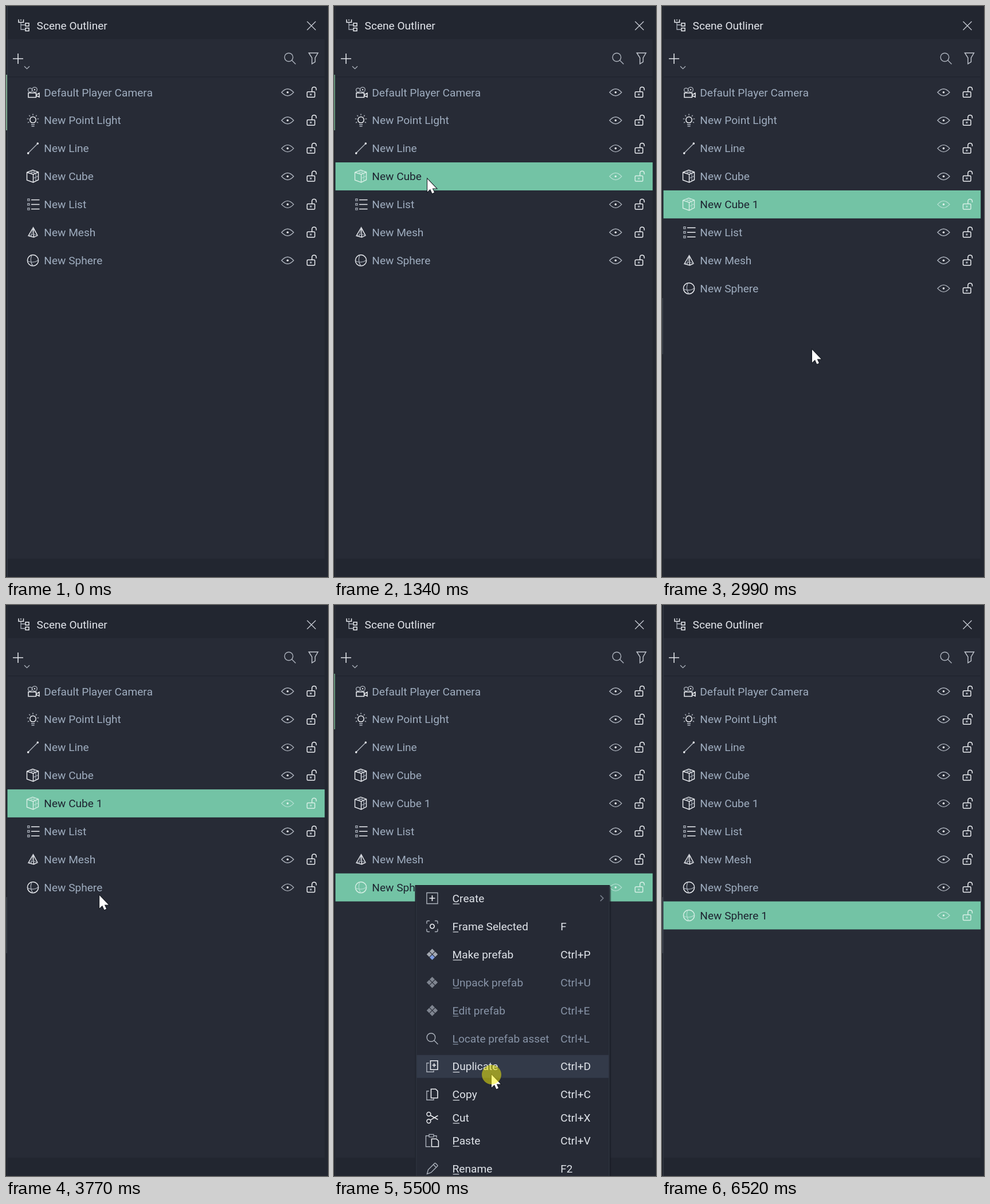
An HTML page with a canvas for the animation above (6.74 s loop, 562 by 997 pixels).

```html
<!DOCTYPE html>
<html lang="en">
<head>
<meta charset="utf-8">
<title>Scene Outliner</title>
<style>
html, body { margin: 0; width: 100%; height: 100%; overflow: hidden; background: #222630; }
canvas { display: block; width: 562px; height: 997px; }
</style>
</head>
<body>
<canvas id="stage"></canvas>
<script>
const W = 562, H = 997, LOOP = 6740;
const canvas = document.getElementById('stage');
const ctx = canvas.getContext('2d');
const dpr = window.devicePixelRatio || 1;
canvas.width = W * dpr;
canvas.height = H * dpr;

const OUTER = '#222630', PANEL = '#272b36', GREEN = '#73c3a5', INK = '#1d2330';
const BRIGHT = '#eceef2', LIGHT = '#e0e4ea', MUTED = '#9fadbf', DIM = '#8793a6', GRAY = '#adb3bd';
const ROW_H = 48.9, ROW_TOP = 126.35;

const TICKS = [0, 70, 290, 510, 720, 940, 1120, 1340, 1520, 1700, 1890, 2080, 2270, 2460, 2640,
  2820, 2990, 3140, 3270, 3430, 3590, 3750, 3920, 4080, 4240, 4410, 4580, 4760, 4930, 5110,
  5320, 5500, 5670, 5840, 6010, 6180, 6350, 6520];

// Pointer path: time, x, y
const PATH = [[70, 262, 610], [940, 163, 302], [1700, 163, 302], [2270, 244, 547], [2640, 264, 612],
  [2820, 264, 612], [2990, 262, 600], [3270, 262, 600], [3920, 143, 488], [4580, 143, 488],
  [5320, 275, 822], [5500, 275, 820], [6520, 275, 820]];

const box = (x, y, w, h) => `M${x} ${y}h${w}v${h}h${-w}z`;
const ring = (x, y, r) => `M${x - r} ${y}a${r} ${r} 0 1 0 ${2 * r} 0a${r} ${r} 0 1 0 ${-2 * r} 0z`;
const gem = (x, y, r) => `M${x} ${y - r}l${r} ${r}l${-r} ${r}l${-r} ${-r}z`;
const line = (d, color = BRIGHT, width = 1.5) => ({ path: new Path2D(d), color, width });
const solid = (d, color = BRIGHT) => ({ path: new Path2D(d), color });

function rays() {
  let d = '';
  for (let i = 0; i < 7; i++) {
    const a = (150 + i * 40) * Math.PI / 180, c = Math.cos(a), s = Math.sin(a);
    d += `M${c * 7.6} ${s * 7.6 - 1}L${c * 10.4} ${s * 10.4 - 1}`;
  }
  return d;
}

const prefab = (top, bottom) => [
  solid(gem(0, -5.2, 4.5) + gem(-5.2, 0, 4.5) + gem(5.2, 0, 4.5), top),
  solid(gem(0, 5.2, 4.5), bottom)
];
const glass = [line(ring(-2, -2, 7.3), GRAY, 1.4), line('M3.3 3.3L10 10', GRAY, 1.4)];

const ICONS = {
  tree: [
    line('M-9 -10.5v5h8.5v-5M-5 -10.5v2', BRIGHT, 1.5),
    line('M-5 -5V7H2M-5 -1H2', GRAY, 1.3),
    line(box(3, -4, 6, 5) + box(3, 4.5, 6, 5))
  ],
  close: [line('M-7.5 -7.5L7.5 7.5M7.5 -7.5L-7.5 7.5', '#c3c8d0', 1.4)],
  plus: [line('M-9 0H9M0 -9V9', '#dfe2e7', 1.6)],
  down: [line('M-4.5 -2.2L0 2.2L4.5 -2.2', GRAY, 1.3)],
  right: [line('M-2.5 -5L2.5 0L-2.5 5', '#7b8390', 1.6)],
  glass,
  funnel: [line('M-8 -9.5H8L3 -1V6L-2.5 9.5V-1z', '#c3c8d0', 1.4)],
  eye: [
    line('M-10.5 0Q-5 -6 0 -6T10.5 0Q5 6 0 6T-10.5 0z', GRAY, 1.4),
    solid(ring(0, 0, 1.8))
  ],
  lock: [
    line('M-6 -1H5Q6.5 -1 6.5 .5V7Q6.5 8.5 5 8.5H-5.5Q-7 8.5 -7 7V.5Q-7 -1 -5.5 -1z'),
    line('M1.5 -1V-5.3Q1.5 -9.2 5.2 -9.2T9 -5.3V-3.5'),
    solid(box(-2, 2.2, 3, 3), GRAY)
  ],
  camera: [
    line(ring(-5, -4, 3.5), GRAY, 1.3),
    line(ring(3, -4.7, 4.3), GRAY, 1.3),
    solid(ring(3, -4.7, 1.2)),
    line(box(-8, 1, 13.5, 7.8) + 'M5.5 4.5L11 1.2V8.2L5.5 5.5')
  ],
  bulb: [
    line('M-2.5 4Q-5.2 2 -5.2 -1A5.2 5.2 0 0 1 5.2 -1Q5.2 2 2.5 4z'),
    line(rays(), GRAY, 1.3),
    line('M-3 7.3H3M-2.5 10.3H2.5', GRAY, 1.3)
  ],
  line: [
    line('M-8.5 8.5L8.5 -8.5', GRAY, 1.4),
    solid(ring(-8.3, 8.5, 1.8) + ring(8.3, -8.5, 1.8))
  ],
  cube: [
    line('M-.5 -11L9.5 -7.5V6L.5 10.5L-10.5 6.5V-7z M-10.5 -7L.5 -3.5L9.5 -7.5M.5 -3.5V10.5', BRIGHT, 1.4),
    line('M-5.5 -9L5.2 -5.5M5 -9.3L-5 -5.3M5 -5.3V8.3M.5 3.5L9.5 -.8', GRAY, 1.1)
  ],
  list: [
    line([-8, 0, 8].map(y => box(-9.2, y - 1.6, 3.2, 3.2)).join(''), GRAY, 1.2),
    line('M-3 -8H11.5M-3 0H11.5M-3 8H11.5')
  ],
  mesh: [
    line('M.5 -8.5L-8 6L1.5 8.5L8 5.5z M.5 -8.5L1.5 8.5', BRIGHT, 1.4),
    line('M.5 -8.5L-3 7M-8 6L1 3L8 5.5', GRAY, 1)
  ],
  sphere: [
    line(ring(0, 0, 9.6)),
    line('M-1.5 -9.5C-5 -4 -4 5 0 9.5M-9.5 1C-4 4 5 4 9.5 -1', GRAY, 1.2)
  ],
  create: [line(box(-9.5, -9.5, 19, 19), GRAY, 1.4), line('M-5 0H5M0 -5V5', BRIGHT, 1.7)],
  frame: [
    line('M-9.5 -4.5V-7.5Q-9.5 -9.5 -7.5 -9.5H-4.5M4.5 -9.5H7.5Q9.5 -9.5 9.5 -7.5V-4.5' +
      'M9.5 4.5V7.5Q9.5 9.5 7.5 9.5H4.5M-4.5 9.5H-7.5Q-9.5 9.5 -9.5 7.5V4.5', GRAY, 1.4),
    line(ring(0, 0, 3.7), BRIGHT, 1.6)
  ],
  prefab: prefab('#a3a8b1', '#7f9de0'),
  prefabOff: prefab('#7f8590', '#7f8590'),
  duplicate: [
    line('M-5.5 -6H-9.5V9.5H2.5V7', GRAY, 1.4),
    line(box(-3, -10, 12.5, 15.5), BRIGHT, 1.6),
    line('M0 -2.2H6.6M3.3 -5.5V1.1', BRIGHT, 1.6)
  ],
  copy: [
    line('M-5.5 -6H-9.5V9.5H2.5V7', GRAY, 1.4),
    line('M-2 -9.5H6L9.5 -6V6H-2z', BRIGHT, 1.6)
  ],
  cut: [
    line(ring(-6, -6, 3.4) + ring(-6, 6.3, 3.4), BRIGHT, 1.5),
    line('M-3.3 -4L10 3.5M-3.3 4.3L10 -3.5', BRIGHT, 1.5)
  ],
  paste: [
    line('M-5.5 -8.5H-11V10.5H-3M2.5 -8.5H7.5V-5', GRAY, 1.4),
    line(box(-5.5, -11, 8, 4.5), GRAY, 1.3),
    line('M-1 -3H7.5L11 .5V10.5H-1z', BRIGHT, 1.6)
  ],
  rename: [line('M-9 9.5L-7 2L4 -9Q5 -10 6 -9L9 -6Q10 -5 9 -4L-2 7z M2 -7L7 -2', GRAY, 1.4)],
  trash: [line('M-9.5 -7.5H9.5M-3 -7.5V-10.5H3V-7.5M-7 -4V10.5H7V-4M-2.5 -3.5V7M2.5 -3.5V7', GRAY, 1.4)]
};

// Menu entries: icon, label, shortcut, centre below the menu top, disabled
const MENU = [
  ['create', 'Create', '', 23],
  ['frame', 'Frame Selected', 'F', 72],
  ['prefab', 'Make prefab', 'Ctrl+P', 121],
  ['prefabOff', 'Unpack prefab', 'Ctrl+U', 170, true],
  ['prefabOff', 'Edit prefab', 'Ctrl+E', 219, true],
  ['glass', 'Locate prefab asset', 'Ctrl+L', 268, true],
  ['duplicate', 'Duplicate', 'Ctrl+D', 316.7],
  ['copy', 'Copy', 'Ctrl+C', 365.7],
  ['cut', 'Cut', 'Ctrl+X', 406],
  ['paste', 'Paste', 'Ctrl+V', 446.3],
  ['rename', 'Rename', 'F2', 495],
  ['trash', 'Delete', 'Del', 544]
];

function rect(x, y, w, h, color) {
  ctx.fillStyle = color;
  ctx.fillRect(x, y, w, h);
}

function text(str, x, y, color) {
  ctx.font = '19.1px Roboto, sans-serif';
  ctx.fontKerning = 'none';
  ctx.fillStyle = color;
  ctx.fillText(str, x, y);
}

function icon(name, x, y, onGreen) {
  ctx.save();
  ctx.translate(x, y);
  for (const { path, color, width } of ICONS[name]) {
    const paint = onGreen ? (color === GRAY ? '#b2ded0' : '#d8efe6') : color;
    if (width) {
      ctx.strokeStyle = paint;
      ctx.lineWidth = width;
      ctx.stroke(path);
    } else {
      ctx.fillStyle = paint;
      ctx.fill(path);
    }
  }
  ctx.restore();
}

function drawWindow(t) {
  rect(0, 0, W, H, OUTER);
  rect(3, 58, 553, 907, PANEL);
  rect(3, 123, 553, 1.5, '#21252f');
  rect(0, 0, 2, H, '#20242d');
  rect(2, 0, 1, H, t < 1120 || t >= 5670 ? '#383d48' : '#292d37');
  const blurred = (t >= 2990 && t < 4080) || t >= 5670;
  if (blurred) rect(0, 510, 2, 98, '#363b45');
  else rect(0, 120, 2, 97, t < 1120 ? '#7da78e' : '#5f8d75');

  icon('tree', 31, 34);
  text('Scene Outliner', 53.6, 41.3, '#e3e6ec');
  icon('close', 533, 34.5);
  icon('plus', 21, 92);
  icon('down', 36.5, 107.5);
  icon('glass', 495.5, 91.5);
  icon('funnel', 536.5, 91.5);
}

function drawRows(t) {
  const rows = [['camera', 'Default Player Camera'], ['bulb', 'New Point Light'], ['line', 'New Line'],
    ['cube', 'New Cube'], ['list', 'New List'], ['mesh', 'New Mesh'], ['sphere', 'New Sphere']];
  if (t >= 2990) rows.splice(4, 0, ['cube', 'New Cube 1']);
  if (t >= 5670) rows.push(['sphere', 'New Sphere 1']);
  const selected = t < 940 ? -1 : t < 2990 ? 3 : t < 4080 ? 4 : t < 5670 ? 7 : 8;

  rows.forEach(([name, label], i) => {
    const on = i === selected, y = ROW_TOP + (i + 0.5) * ROW_H;
    if (on) rect(2.5, y - ROW_H / 2, 553.7, ROW_H, GREEN);
    icon(name, 47, y, on);
    text(label, 66.3, y + 6.7, on ? INK : MUTED);
    icon('eye', 491.5, y, on);
    icon('lock', 532.5, y, on);
  });
}

function drawMenu(left, top, pointer) {
  rect(left + 2, top + 2, 340, 566, 'rgba(20,24,32,.5)');
  rect(left, top, 340, 566, '#20242e');
  rect(left + 1.5, top + 2, 338, 564, '#2d323d');
  rect(left + 3, top + 3, 335, 561, '#262a35');

  for (const [name, label, keys, dy, off] of MENU) {
    const y = top + dy, color = off ? DIM : LIGHT;
    if (!off && Math.abs(pointer.y - y) < 20 && pointer.x > left + 3) {
      rect(left + 3, y - 20, 335, 40, '#333a49');
    }
    const tx = left + 65.2, base = y + 6.7;
    icon(name, left + 30, y);
    text(label, tx, base, color);
    rect(tx + 1, base + 2.6, ctx.measureText(label[0]).width - 1, 1.2, color);
    if (keys) text(keys, left + 253.8, base, color);
    else icon('right', left + 326, y);
  }
}

const ARROW = new Path2D('M0 0V22.5L5 17.8L8.4 25.2L12 23.6L8.7 16.4H15.8z');

function drawPointer({ x, y }, clicking) {
  ctx.save();
  ctx.translate(x, y);
  ctx.lineWidth = 2;
  ctx.strokeStyle = '#161a22';
  ctx.stroke(ARROW);
  ctx.fillStyle = '#fff';
  ctx.fill(ARROW);
  if (clicking) {
    ctx.fillStyle = 'rgba(246,240,10,.52)';
    ctx.beginPath();
    ctx.arc(0, 0, 17, 0, 7);
    ctx.fill();
  }
  ctx.restore();
}

function pointerAt(t) {
  const i = PATH.findIndex(p => p[0] > t);
  if (i < 1) return { x: PATH[0][1], y: PATH[0][2] };
  const [t0, x0, y0] = PATH[i - 1], [t1, x1, y1] = PATH[i];
  const u = (t - t0) / (t1 - t0), k = u * u * (3 - 2 * u);
  return { x: x0 + (x1 - x0) * k, y: y0 + (y1 - y0) * k };
}

function draw(now) {
  const time = now % LOOP;
  const t = TICKS.filter(tick => tick <= time).pop() || 0;
  const within = (a, b) => t >= a && t < b;
  const pointer = pointerAt(t);

  ctx.setTransform(dpr, 0, 0, dpr, 0, 0);
  drawWindow(t);
  drawRows(t);
  if (within(1520, 2990)) drawMenu(163, 302, pointer);
  if (within(4410, 5670)) drawMenu(141.4, 489, pointer);
  if (within(70, 6520)) drawPointer(pointer, within(2820, 2990) || within(5500, 5670));
}

const start = performance.now();
function loop() {
  draw(performance.now() - start);
  requestAnimationFrame(loop);
}
loop();
</script>
</body>
</html>
```
